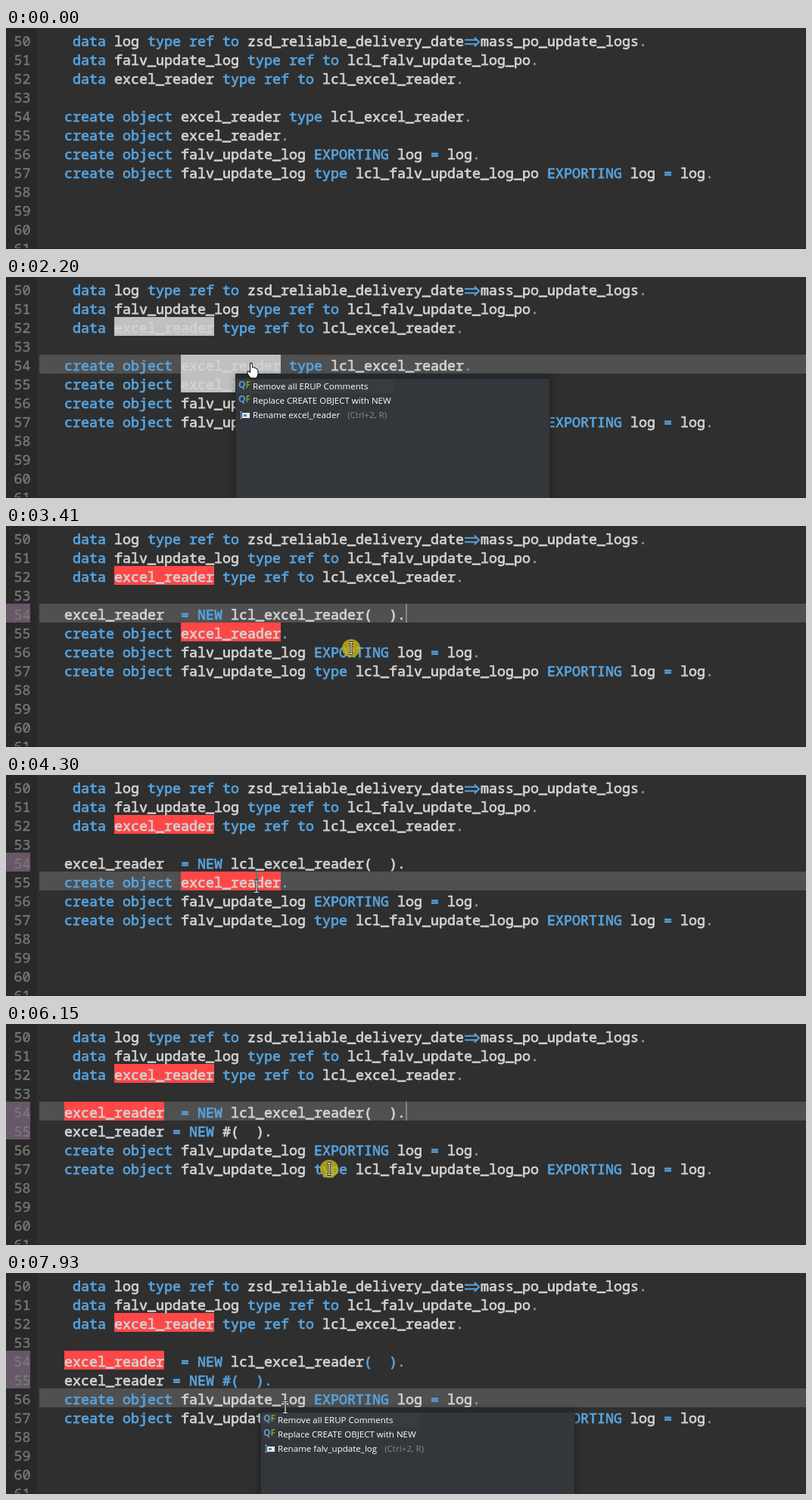
Write an HTML page with a canvas that moves like this. It is 1057 px wide and 293 px high and loops after 8 s.

```html
<!DOCTYPE html>
<html lang="en">
<head>
<meta charset="utf-8">
<title>Quick fix demo</title>
<style>
  html, body { margin: 0; width: 100%; height: 100%; overflow: hidden; background: #2f2f2f; }
  canvas { display: block; width: 1057px; height: 293px; }
</style>
</head>
<body>
<canvas id="stage"></canvas>
<script>
const W = 1057, H = 293, LOOP = 8000;
const CELL = 11, ROW = 25, LEFT = 44, FIRST = 50;
const CODE_FONT = '18.333px "Noto Sans Mono", "DejaVu Sans Mono", monospace';
const UI_FONT = '11.55px "Open Sans", "Noto Sans", sans-serif';
const ICON_FONT = 'bold 12px "Open Sans", "Noto Sans", sans-serif';
const BLUE = '#56a3df', TEXT = '#d2d2d2';
const GREY = '#c0c0c0', RED = '#ff4747', TEAL = '#007f7f';
const KEYWORDS = /^(data|type|ref|to|create|object|EXPORTING|NEW|[=.]|=>)$/;

const canvas = document.getElementById('stage');
const ctx = canvas.getContext('2d');
const dpr = window.devicePixelRatio || 1;
canvas.width = W * dpr;
canvas.height = H * dpr;

const between = (t, a, b) => t >= a && t < b;
const clamp = v => Math.max(0, Math.min(1, v));
const colX = col => LEFT + col * CELL;
const rowY = line => 3 + (line - FIRST) * ROW;

function rect(x, y, w, h, color) {
  ctx.fillStyle = color;
  ctx.fillRect(x, y, w, h);
}

function label(str, x, y, color, font = UI_FONT) {
  ctx.font = font;
  ctx.fillStyle = color;
  ctx.fillText(str, x, y);
}

// Code text is thickened with an outline to a semi-bold weight
function code(str, x, y, color, weight) {
  label(str, x, y, color, CODE_FONT);
  ctx.strokeStyle = color;
  ctx.lineWidth = weight;
  ctx.lineJoin = 'round';
  ctx.strokeText(str, x, y);
}

// Key times of the quick fixes
const FIX1 = 3400, FIX2 = 6080, RECOLOR = 7180;

function codeLines(t) {
  return {
    50: '    data log type ref to zsd_reliable_delivery_date=>mass_po_update_logs.',
    51: '    data falv_update_log type ref to lcl_falv_update_log_po.',
    52: '    data excel_reader type ref to lcl_excel_reader.',
    54: t < FIX1 ? '   create object excel_reader type lcl_excel_reader.'
                 : '   excel_reader  = NEW lcl_excel_reader(  ).',
    55: t < FIX2 ? '   create object excel_reader.'
                 : '   excel_reader = NEW #(  ).',
    56: '   create object falv_update_log EXPORTING log = log.',
    57: '   create object falv_update_log type lcl_falv_update_log_po EXPORTING log = log.'
  };
}

function drawArrow(x, y) {
  ctx.strokeStyle = BLUE;
  ctx.lineWidth = 2;
  ctx.lineJoin = 'miter';
  ctx.beginPath();
  ctx.moveTo(x + 1, y - 2.7); ctx.lineTo(x + 17, y - 2.7);
  ctx.moveTo(x + 1, y + 2.7); ctx.lineTo(x + 17, y + 2.7);
  ctx.moveTo(x + 14, y - 6); ctx.lineTo(x + 20, y); ctx.lineTo(x + 14, y + 6);
  ctx.stroke();
}

function drawLine(line, str, t) {
  const replaced = str.includes('NEW');
  const fresh = replaced && t < RECOLOR;
  for (const m of str.matchAll(/\w+|=>|[^\s\w]/g)) {
    const tok = m[0], x = colX(m.index), y = rowY(line);
    if (tok === '=>') { drawArrow(x, y + 15.5); continue; }
    let blue = KEYWORDS.test(tok);
    if (replaced && /[#().]/.test(tok)) blue = !fresh;
    code(tok, x, y + 21, blue ? BLUE : TEXT, 0.75);
  }
}

function currentLine(t) {
  if (t < 970) return 0;
  if (t < 4090) return 54;
  if (t < FIX2) return 55;
  return t < 6910 ? 54 : 56;
}

// Boxes behind each occurrence of excel_reader: [line, column, color]
function occurrences(t) {
  if (t < 1780) return [];
  if (t < 2620) return [[52, 9, GREY], [54, 17, GREY], [55, 17, GREY]];
  if (t < FIX1) return [[52, 9, RED], [54, 17, TEAL], [55, 17, RED]];
  if (t < 4780) return [[52, 9, RED], [55, 17, RED]];
  if (t < 5740) return [[52, 9, GREY], [54, 3, GREY], [55, 17, GREY]];
  if (t < FIX2) return [[52, 9, RED], [54, 3, RED], [55, 17, TEAL]];
  return [[52, 9, RED], [54, 3, RED]];
}

function drawEditor(t) {
  rect(0, 0, W, H, '#2f2f2f');
  rect(0, 0, 41, H, '#292929');
  if (t >= FIX1) rect(0, rowY(54), 32, ROW, '#675768');
  if (t >= FIX2) rect(0, rowY(55), 32, ROW, '#675768');
  const cur = currentLine(t);
  if (cur) rect(LEFT, rowY(cur), W - LEFT, ROW, '#505050');
  for (const [line, col, color] of occurrences(t)) {
    rect(colX(col), rowY(line), 12 * CELL, ROW, color);
  }
  for (let n = FIRST; n <= 61; n++) code(String(n), 10.5, rowY(n) + 21, '#787878', 0.4);
  const lines = codeLines(t);
  for (const n in lines) drawLine(+n, lines[n], t);
  rect(0, 292, W, 1, '#272727');
}

function drawCaret(t) {
  const spots = [
    [970, 1510, 54, 23], [FIX1, 3930, 54, 44], [4090, 4710, 55, 26],
    [FIX2, 6610, 54, 44], [6910, 7510, 56, 26]
  ];
  for (const [a, b, line, col] of spots) {
    if (!between(t, a, b)) continue;
    ctx.globalCompositeOperation = 'difference';
    rect(colX(col), rowY(line), 2, ROW, '#d4d4d4');
    ctx.globalCompositeOperation = 'source-over';
  }
}

function drawRenameIcon(x, y) {
  rect(x + 3, y - 3, 10, 7, '#e4e8ea');
  rect(x + 5, y - 1, 4, 3, '#4a86b8');
  rect(x + 1, y - 5, 1, 10, '#6fa3cc');
  rect(x, y - 5, 3, 1, '#6fa3cc');
  rect(x, y + 4, 3, 1, '#6fa3cc');
}

function drawItem(x, y, str) {
  label('Q', x + 4, y + 2, '#5b9bd3', ICON_FONT);
  label('F', x + 13.5, y + 2, '#749c3c', ICON_FONT);
  label(str, x + 23, y + 4, '#fff');
}

function drawPopup(x, y, o) {
  ctx.globalAlpha = o.alpha;
  ctx.shadowColor = 'rgba(0, 0, 0, 0.4)';
  ctx.shadowBlur = 9 * dpr;
  ctx.shadowOffsetY = 3 * dpr;
  rect(x, y, 416, H - y + 20, '#26292b');
  ctx.shadowColor = 'transparent';
  rect(x + 1, y + 1, 414, H - y, '#33373b');
  rect(x + 1, y + 1, 414, 6, o.strip);
  if (o.selected === 0) rect(x + 2, y + 8, 208, 18, '#393c3f');
  if (o.selected === 1) {
    rect(x + 5, y + 27, 205, 18, o.focus ? '#57595a' : '#484b4e');
    if (o.focus) {
      ctx.strokeStyle = '#b8b8b8';
      ctx.lineWidth = 1;
      ctx.setLineDash([1, 1]);
      ctx.strokeRect(x + 21.5, y + 26.5, 188, 17);
      ctx.setLineDash([]);
    }
  }
  drawItem(x, y + 17, 'Remove all ERUP Comments');
  drawItem(x, y + 36, 'Replace CREATE OBJECT with NEW');
  drawRenameIcon(x + 6, y + 55);
  const rename = 'Rename ' + o.name;
  label(rename, x + 23, y + 59, '#fff');
  label('(Ctrl+2, R)', x + 33 + ctx.measureText(rename).width, y + 59, '#85888b');
  if (o.info) {
    rect(x + 421, y, W, H - y, '#505558');
    label('Removes all ERUP Comments from the code. Please think twice before using it.',
      x + 423, y + 13, '#fff');
  }
  ctx.globalAlpha = 1;
}

function drawPopups(t) {
  if (between(t, 1850, FIX1)) {
    const focus = t >= 2750;
    drawPopup(303, 128, {
      alpha: clamp((t - 1800) / 220), selected: focus ? 1 : 0, focus,
      strip: t >= 2620 ? '#000' : '#26292b', info: t >= 2550, name: 'excel_reader'
    });
  }
  if (between(t, 4850, FIX2)) {
    drawPopup(336, 153, {
      alpha: clamp((t - 4800) / 220), selected: t >= 5320 ? 1 : 0, focus: t >= 5740,
      strip: '#26292b', info: t >= 5400, name: 'excel_reader'
    });
  }
  if (t >= 7580) {
    drawPopup(336, 178, {
      alpha: clamp((t - 7530) / 220), selected: 0,
      strip: '#26292b', info: false, name: 'falv_update_log'
    });
  }
}

// Mouse track: time, x, y
const TRACK = [
  [130, 914, 258], [890, 298, 113], [1050, 298, 113], [1310, 324, 114], [2200, 324, 114],
  [2900, 456, 162], [3500, 456, 162], [3890, 335, 150], [4090, 331, 148], [4800, 331, 148],
  [5470, 429, 188], [5540, 427, 192], [6200, 427, 192], [6780, 330, 166],
  [7510, 330, 166], [7900, 369, 178]
];

function mouseAt(t) {
  let prev = TRACK[0];
  for (const key of TRACK) {
    if (t < key[0]) {
      const u = clamp((t - prev[0]) / (key[0] - prev[0]));
      const e = u * u * (3 - 2 * u);
      return [prev[1] + (key[1] - prev[1]) * e, prev[2] + (key[2] - prev[2]) * e];
    }
    prev = key;
  }
  return [prev[1], prev[2]];
}

function drawShape(x, y, points) {
  ctx.beginPath();
  points.forEach(([px, py]) => ctx.lineTo(x + px, y + py));
  ctx.closePath();
  ctx.fillStyle = '#fff';
  ctx.strokeStyle = '#000';
  ctx.lineWidth = 1;
  ctx.lineJoin = 'round';
  ctx.fill();
  ctx.stroke();
}

const ARROW = [[0, 0], [0, 16], [3.7, 12.6], [6.3, 18.5], [8.8, 17.4], [6.3, 11.6], [11.3, 11.6]];
const HAND = [
  [-1.5, 0], [1, 0], [1.5, 6], [4, 6], [6, 7], [8, 8], [9, 10], [9, 15], [7, 20],
  [-1, 20], [-5, 14], [-5, 11], [-3, 11], [-1.5, 13]
];

function drawBeam(x, y) {
  const strokes = [[3, '#222'], [1.2, '#f4f4f4']];
  for (const [width, color] of strokes) {
    ctx.strokeStyle = color;
    ctx.lineWidth = width;
    ctx.beginPath();
    ctx.moveTo(x - 3, y - 7.5); ctx.lineTo(x + 3, y - 7.5);
    ctx.moveTo(x, y - 7.5); ctx.lineTo(x, y + 7.5);
    ctx.moveTo(x - 3, y + 7.5); ctx.lineTo(x + 3, y + 7.5);
    ctx.stroke();
  }
}

const CLICKS = [[970, 1130], [3270, 3520], [4090, 4230], [5990, 6260], [6780, 6910]];

function drawMouse(t) {
  if (t < 130) return;
  const [x, y] = mouseAt(t);
  if (CLICKS.some(([a, b]) => between(t, a, b))) {
    ctx.fillStyle = 'rgba(200, 182, 20, 0.8)';
    ctx.beginPath();
    ctx.arc(x, y, 12, 0, 2 * Math.PI);
    ctx.fill();
  }
  if (between(t, 1780, 2270)) drawShape(x, y, HAND);
  else if (between(t, 2270, FIX1) || between(t, 4900, FIX2)) drawShape(x, y, ARROW);
  else drawBeam(x, y);
}

function render(now) {
  const t = now % LOOP;
  ctx.setTransform(dpr, 0, 0, dpr, 0, 0);
  drawEditor(t);
  drawCaret(t);
  drawPopups(t);
  drawMouse(t);
}

let start;
function tick(now) {
  if (start === undefined) start = now;
  render(now - start);
  requestAnimationFrame(tick);
}
render(0);
requestAnimationFrame(tick);
</script>
</body>
</html>
```
